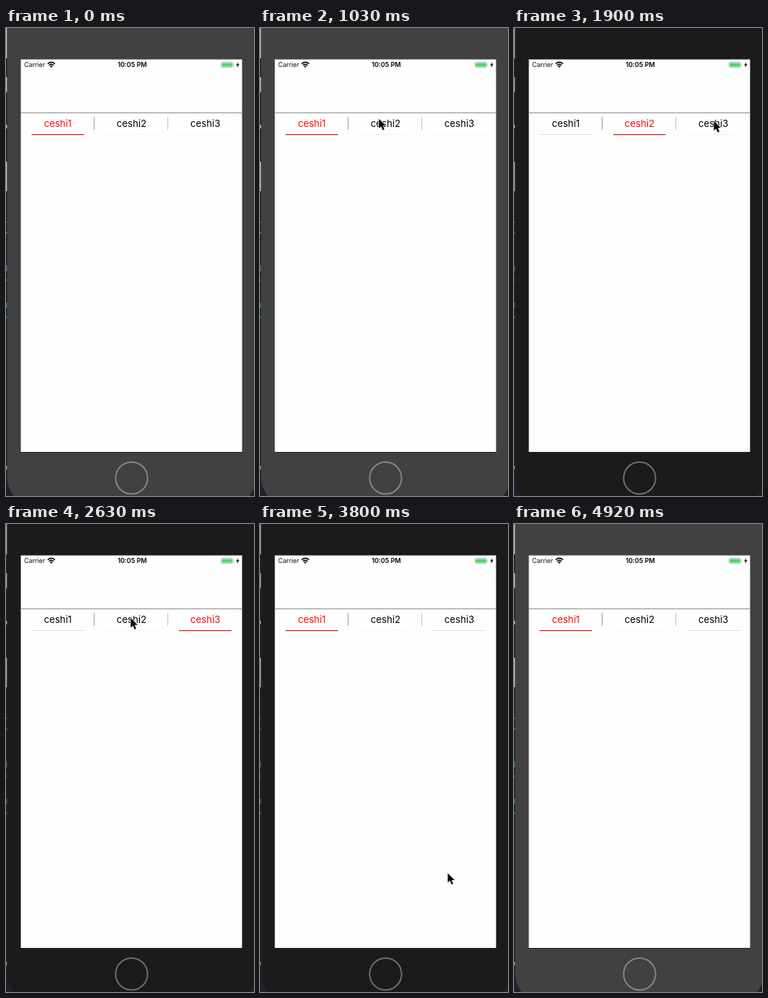
These frames come from a looping animation (343x648 px, 5.02 s). An HTML page:

```html
<!DOCTYPE html>
<html lang="en">
<head>
<meta charset="utf-8">
<title>Tab bar</title>
<style>
  html, body { margin: 0; width: 100%; height: 100%; overflow: hidden; background: #20212c; }
  svg { display: block; width: 343px; height: 648px; font-family: Inter, Roboto, sans-serif; }
</style>
</head>
<body>
<svg viewBox="0 0 343 648" xmlns="http://www.w3.org/2000/svg">
  <rect width="343" height="648" fill="#20212c"/>
  <!-- sliver of the editor window behind the phone -->
  <g id="strip" stroke-width="1.6">
    <path d="M.8 0V648" stroke="#c6c6c6" stroke-dasharray="42 26 21 45 5 46 41 500"/>
    <path d="M.8 268V410" stroke="#23877e" stroke-dasharray="2 12 3 44 8 11 2 30 8 11 3 50"/>
    <path d="M.8 606V611" stroke="#a29a72"/>
  </g>
  <rect id="phone" x="1.5" y="-60" width="344" height="724" rx="42"/>
  <circle id="home" cx="173.7" cy="623.2" r="22.1" fill="none" stroke-width="2"/>
  <rect x="20.5" y="43.5" width="306" height="543.5" fill="#fefefe"/>
  <rect x="20.5" y="587" width="306" height="1" fill="#1b1b1b"/>

  <text x="25" y="54.3" font-size="8.9" fill="#111">Carrier</text>
  <g fill="none" stroke="#000" stroke-width="1.7">
    <path d="M57.7 49.6Q62.7 45.2 67.7 49.6"/>
    <path d="M59.5 51.7Q62.7 48.9 65.9 51.7"/>
  </g>
  <path d="M60.8 53Q62.7 51.5 64.6 53L62.7 55Z"/>
  <text x="174.6" y="54.3" font-size="9" font-weight="600" text-anchor="middle">10:05 PM</text>
  <rect x="297.4" y="47.4" width="16.4" height="7.2" rx="1.8" fill="#fff" stroke="#aaa" stroke-width=".8"/>
  <rect x="298.4" y="48.4" width="14.4" height="5.2" rx="1" fill="#4cd964"/>
  <path d="M314.6 49.8Q316 51 314.6 52.2Z" fill="#aaa"/>
  <path d="M321.6 47L318.2 51.6H320.3L319.3 55L322.8 50.3H320.7Z"/>

  <rect x="20.5" y="117" width="306" height="1" fill="#888c88"/>
  <rect x="121.4" y="123" width="1.1" height="18" fill="#999"/>
  <rect x="223.2" y="123" width="1.1" height="18" fill="#c4c4c4"/>
  <g id="tabs" font-size="13.2" text-anchor="middle"></g>
  <path id="cursor" d="M0 0V13.2L3.1 10.4 5.3 15.6 7.6 14.6 5.4 9.5H9.5Z"
    stroke="#fff" stroke-width="1.3" stroke-linejoin="round" paint-order="stroke"/>
</svg>
<script>
const LOOP = 5020, START = 288, STEP = 146.3;
const FOCUS = 6, GONE = 28, BLUR_MS = 4920;
const $ = id => document.getElementById(id);

function set(el, attrs) {
  for (const key in attrs) el.setAttribute(key, attrs[key]);
}
function add(parent, tag, attrs, text = '') {
  const el = document.createElementNS('http://www.w3.org/2000/svg', tag);
  set(el, attrs);
  el.textContent = text;
  return parent.appendChild(el);
}

const tabs = [0, 1, 2].map(i => {
  const x = 71.7 + i * 102;
  return {
    label: add($('tabs'), 'text', { x, y: 137 }, 'ceshi' + (i + 1)),
    line: add($('tabs'), 'rect', { x: x - 36.4, y: 147, width: 72.6 })
  };
});

// Pointer stops, in steps; a stop with a tab clicks it on leaving
const stops = [
  { arrive: 0, leave: 0, x: 262, y: 600 },
  { arrive: 5, leave: 6, x: 164, y: 125.5, tab: 1 },
  { arrive: 11, leave: 12, x: 276, y: 128.5, tab: 2 },
  { arrive: 16, leave: 17, x: 172, y: 130, tab: 1 },
  { arrive: 21, leave: 22, x: 57, y: 129.5, tab: 0 },
  { arrive: 23, leave: 23, x: 225, y: 365 },
  { arrive: 27, leave: 27, x: 303, y: 635 }
];

const easeOut = u => 1 - (1 - u) ** 2;

function pointer(step) {
  const i = stops.findIndex(s => step <= s.leave);
  const to = stops[i], from = stops[i - 1] || to;
  const u = Math.min(1, (step - from.leave) / (to.arrive - from.leave || 1));
  const mix = key => from[key] + (to[key] - from[key]) * easeOut(u);
  return [mix('x') + .5, mix('y') + .3];
}

function selected(step) {
  const clicked = stops.filter(s => 'tab' in s && s.leave <= step);
  return clicked.length ? clicked.pop().tab : 0;
}

function draw(t) {
  const step = Math.floor((t - START) / STEP);
  const focused = step >= FOCUS && t < BLUR_MS;
  set($('phone'), { fill: focused ? '#1b1b1b' : '#414141' });
  set($('home'), { stroke: focused ? '#6e6e6e' : '#858585' });
  set($('strip'), { opacity: focused ? .8 : 1 });

  const active = selected(step);
  tabs.forEach(({ label, line }, i) => {
    const on = i === active;
    const grey = i === 0 || (i === 2 && step > 12) ? '#dedede' : '#f1f1f1';
    set(label, { fill: on ? '#ff0808' : '#000' });
    set(line, { height: on ? 1.2 : 1, fill: on ? '#d81418' : grey });
  });

  const visible = step >= 0 && step < GONE;
  set($('cursor'), { visibility: visible ? 'visible' : 'hidden' });
  if (visible) set($('cursor'), { transform: `translate(${pointer(step)})` });
}

const start = performance.now();
function tick() {
  draw((performance.now() - start) % LOOP);
  requestAnimationFrame(tick);
}
tick();
</script>
</body>
</html>
```
